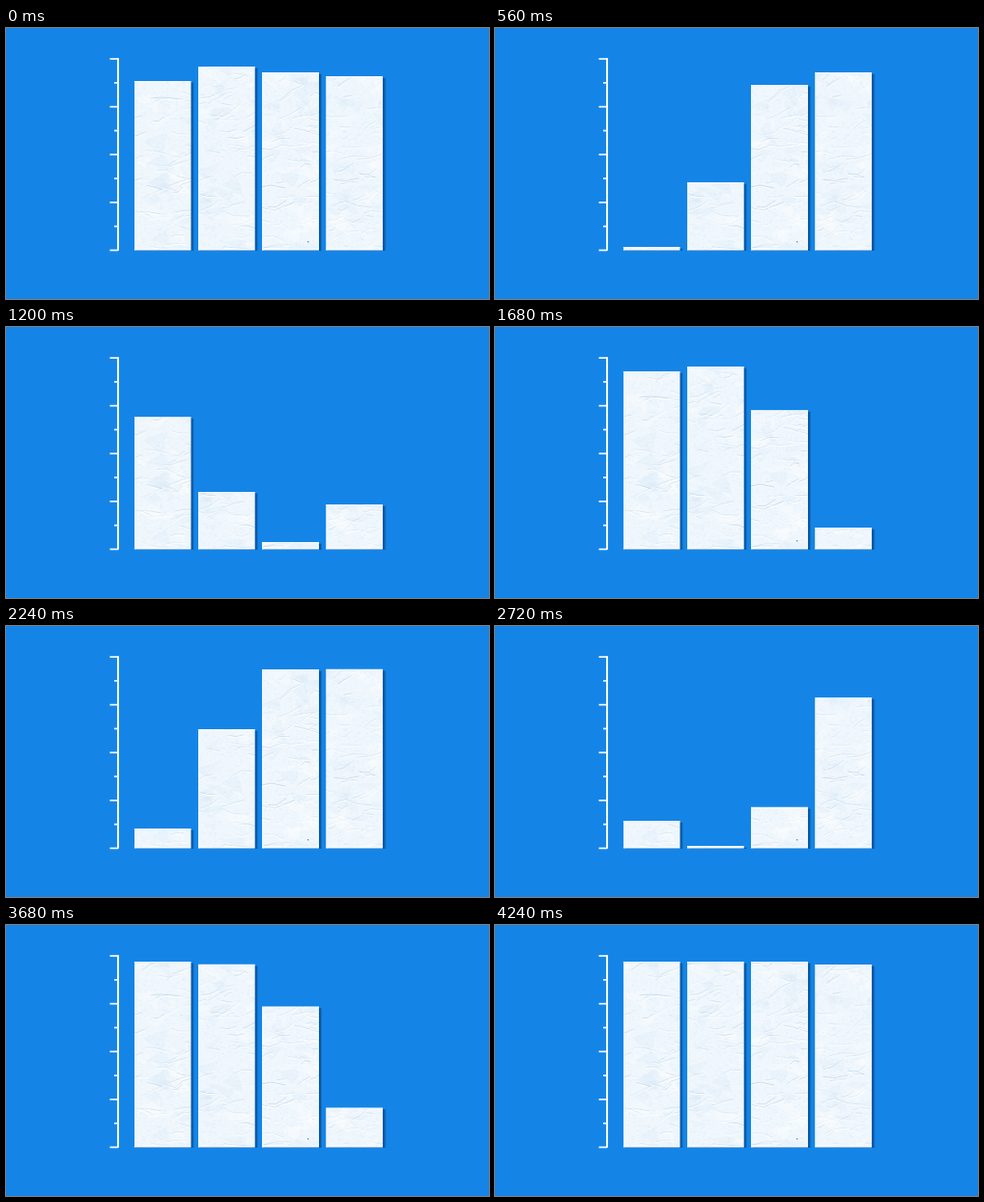
Recreate the animation shown at these times as an HTML page with a canvas. Size 500 px wide and 281 px high, loop 4.32 s.

```html
<!DOCTYPE html>
<html lang="en">
<head>
<meta charset="utf-8">
<title>Paper bar chart</title>
<style>
  html, body { margin: 0; width: 100%; height: 100%; overflow: hidden; background: #1485e7; }
  canvas { display: block; width: 500px; height: 281px; }
</style>
</head>
<body>
<canvas id="stage" width="500" height="281"></canvas>
<script>
const LOOP = 4320, STEP = 80;
const HIGH = 38, LOW = 228, BASE = 230.5, BAR_W = 59;
const PAPER_TOP = 34, PAPER_H = 198;

// Each key is [time in ms, top edge of the bar]
const bars = [
  { x: 132.5, keys: [[-133, HIGH], [591, LOW], [640, LOW], [1510, HIGH], [1579, HIGH],
                     [2395, LOW], [2516, LOW], [3396, HIGH]] },
  { x: 198.7, keys: [[-827, LOW], [53, HIGH], [110, HIGH], [865, LOW], [890, LOW], [1743, HIGH],
                     [1907, HIGH], [2723, LOW], [2864, LOW], [3744, HIGH]] },
  { x: 265, keys: [[-771, LOW], [109, HIGH], [414, HIGH], [1119, LOW], [1955, HIGH],
                   [2146, HIGH], [2962, LOW], [3084, LOW], [3964, HIGH]] },
  { x: 331.2, keys: [[-745, LOW], [135, HIGH], [426, HIGH], [1458, 211], [1626, 211], [2323, HIGH],
                     [2492, HIGH], [3308, LOW], [3425, LOW], [4305, HIGH]] }
];

const stage = document.getElementById('stage');
const ctx = stage.getContext('2d');

function seeded(seed) {
  return () => {
    seed = (seed * 1664525 + 1013904223) >>> 0;
    return seed / 4294967296;
  };
}

// A sheet of crumpled paper, drawn once per bar
function makePaper(seed) {
  const rnd = seeded(seed);
  const between = (a, b) => a + (b - a) * rnd();
  const sheet = document.createElement('canvas');
  sheet.width = BAR_W;
  sheet.height = PAPER_H;
  const g = sheet.getContext('2d');
  g.fillStyle = '#eff7fd';
  g.fillRect(0, 0, BAR_W, PAPER_H);

  // soft facets
  for (let i = 0; i < 45; i++) {
    const x = between(-10, BAR_W), y = between(0, PAPER_H);
    g.fillStyle = i % 2 ? 'rgba(255,255,255,.32)' : 'rgba(212,231,246,.24)';
    g.beginPath();
    g.moveTo(x, y);
    g.lineTo(x + between(10, 32), y + between(-12, 8));
    g.lineTo(x + between(4, 28), y + between(4, 18));
    g.fill();
  }

  // grain
  for (let i = 0; i < 1500; i++) {
    g.fillStyle = i % 2 ? 'rgba(255,255,255,.4)' : 'rgba(196,219,238,.22)';
    g.fillRect(between(0, BAR_W), between(0, PAPER_H), between(.6, 2), 1);
  }

  // creases: a shaded line with a bright lip below it
  for (let i = 0; i < 46; i++) {
    const x = between(-12, BAR_W - 6), y = between(2, PAPER_H);
    const angle = between(-.65, .3), len = between(6, 30), bend = between(-3, 3);
    const dx = len * Math.cos(angle), dy = len * Math.sin(angle);
    const crease = (shift, color, width) => {
      g.strokeStyle = color;
      g.lineWidth = width;
      g.beginPath();
      g.moveTo(x, y + shift);
      g.lineTo(x + dx * .45, y + dy * .45 + bend + shift);
      g.lineTo(x + dx, y + dy + shift);
      g.stroke();
    };
    crease(0, `rgba(176,205,228,${between(.2, .6)})`, between(.6, 1.1));
    crease(1.1, 'rgba(255,255,255,.75)', 1);
  }
  return sheet;
}

bars.forEach((bar, i) => { bar.paper = makePaper(71 + i * 937); });

// the small fleck on the third sheet
const fleck = bars[2].paper.getContext('2d');
fleck.fillStyle = '#5f97c4';
fleck.fillRect(47, 187, 1.4, 1.4);

function topAt(keys, t) {
  const next = keys.findIndex(k => k[0] > t);
  if (next < 0) return keys[keys.length - 1][1];
  const [t0, y0] = keys[next - 1], [t1, y1] = keys[next];
  const p = (t - t0) / (t1 - t0);
  return y0 + (y1 - y0) * p * p * (3 - 2 * p);
}

function drawAxis() {
  ctx.fillStyle = '#f4faff';
  ctx.fillRect(115, 31.2, 2, 199.6);
  for (let i = 0; i < 9; i++) {
    const left = i % 2 ? 112 : 107.5;
    ctx.fillRect(left, 31.2 + i * 24.8, 116 - left, 1.7);
  }
}

function drawBar({ x, keys, paper }, t) {
  const top = topAt(keys, t), h = BASE - top;
  ctx.fillStyle = 'rgba(8,72,140,.35)';
  ctx.fillRect(x + 2, top + 1.5, BAR_W + 1, h - 1);
  ctx.fillStyle = 'rgba(8,72,140,.6)';
  ctx.fillRect(x + 2, top + 2, BAR_W, h - 1.5);
  ctx.save();
  ctx.beginPath();
  ctx.rect(x, top, BAR_W, h);
  ctx.clip();
  ctx.drawImage(paper, x, PAPER_TOP);
  ctx.fillStyle = 'rgba(255,255,255,.6)';
  ctx.fillRect(x, top, BAR_W, 1);
  ctx.fillRect(x, BASE - 1.3, BAR_W, 1.3);
  ctx.restore();
}

function draw(t) {
  ctx.fillStyle = '#1485e7';
  ctx.fillRect(0, 0, 500, 281);
  drawAxis();
  bars.forEach(bar => drawBar(bar, t));
}

let start;
function tick(now) {
  if (start === undefined) start = now;
  const t = Math.max(0, now - start) % LOOP;
  draw(Math.floor(t / STEP) * STEP);
  requestAnimationFrame(tick);
}
draw(0);
requestAnimationFrame(tick);
</script>
</body>
</html>
```
